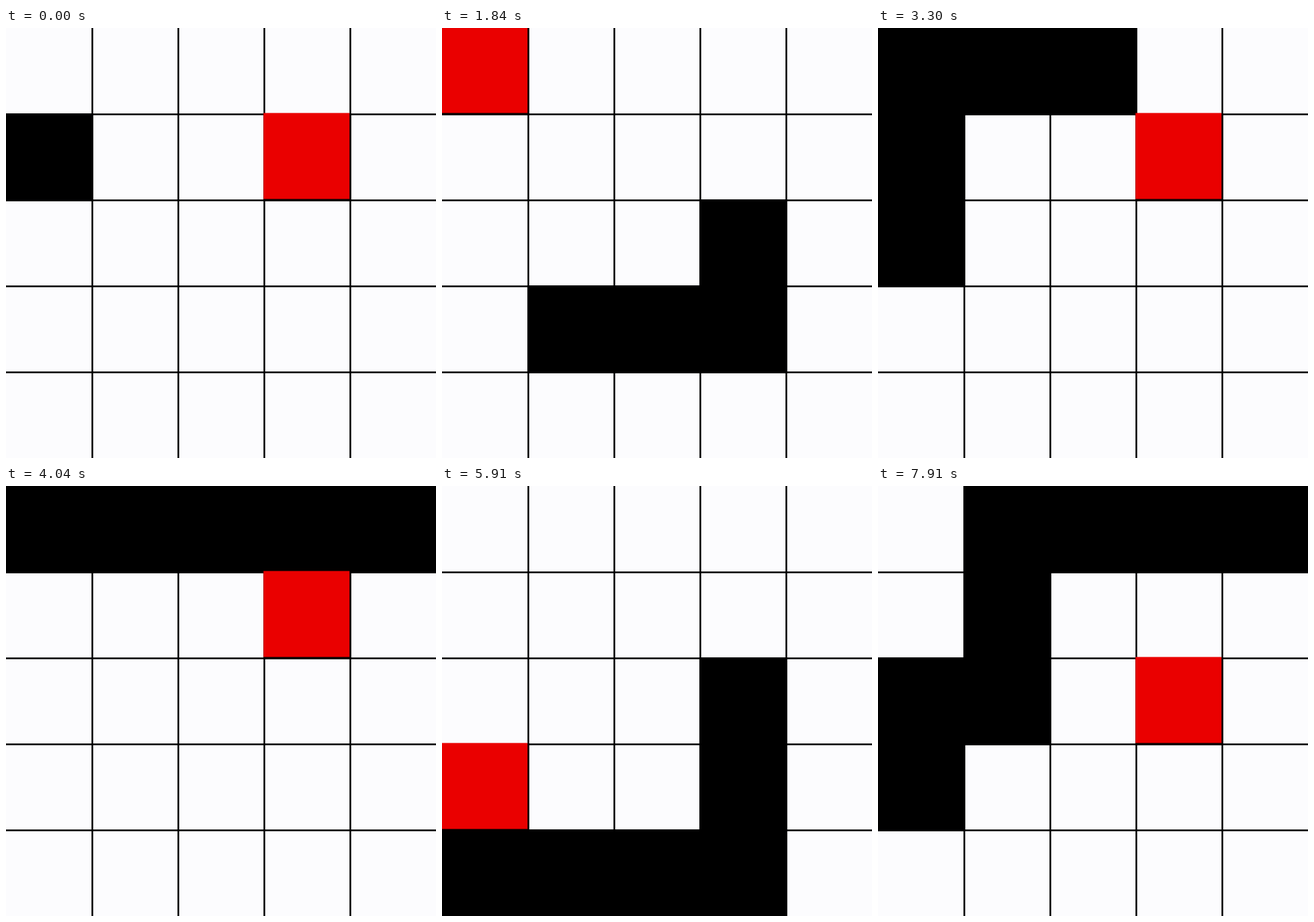
An HTML page with a canvas for the animation above (8 s loop, 640 px wide and 640 px high).

```html
<!DOCTYPE html>
<html lang="en">
<head>
<meta charset="utf-8">
<title>Snake on a small grid</title>
<style>
  html, body { margin: 0; width: 100%; height: 100%; overflow: hidden; background: #fcfcfe; }
  canvas { display: block; width: 640px; height: 640px; }
</style>
</head>
<body>
<canvas id="stage" width="640" height="640"></canvas>
<script>
const ctx = document.getElementById('stage').getContext('2d');
const SIZE = 640, COUNT = 5, CELL = SIZE / COUNT;
const LOOP = 8000, STEP = 256, LEAD = 42;
const LINE = 2.5, EDGE = 0.75;

const START = [0, 1];
const DIRS = { R: [1, 0], L: [-1, 0], D: [0, 1], U: [0, -1] };

// Each leg of the route ends on the food.
const LEGS = 'RRR DDL LLUUU RRRRDL DDDLLLU UR UURRRDDL'.split(' ');

const move = ([x, y], key) => [x + DIRS[key][0], y + DIRS[key][1]];

// Play the game once; the body grows on the move after a meal.
function play() {
  const states = [];
  let body = [START];
  for (const leg of LEGS) {
    const food = [...leg].reduce(move, body[0]);
    states.push({ body, food });
    [...leg].forEach((key, i) => {
      const tail = i === 0 ? body : body.slice(0, -1);
      body = [move(body[0], key), ...tail];
      if (i < leg.length - 1) states.push({ body, food });
    });
  }
  return states;
}

const STATES = play();

function block([x, y]) {
  ctx.fillRect(x * CELL - EDGE, y * CELL - EDGE, CELL + LINE, CELL + LINE);
}

function draw({ body, food }) {
  ctx.fillStyle = '#fcfcfe';
  ctx.fillRect(0, 0, SIZE, SIZE);
  ctx.fillStyle = '#000';
  for (let i = 1; i < COUNT; i++) {
    const p = i * CELL - EDGE;
    ctx.fillRect(p, 0, LINE, SIZE);
    ctx.fillRect(0, p, SIZE, LINE);
  }
  body.forEach(block);
  block(food);
  ctx.fillStyle = '#ea0000';
  ctx.fillRect(food[0] * CELL - EDGE, food[1] * CELL - 1.5, CELL, CELL);
}

const begin = performance.now();

function frame() {
  const t = (performance.now() - begin) % LOOP;
  draw(STATES[Math.floor((t + LEAD) / STEP)]);
  requestAnimationFrame(frame);
}
frame();
</script>
</body>
</html>
```
